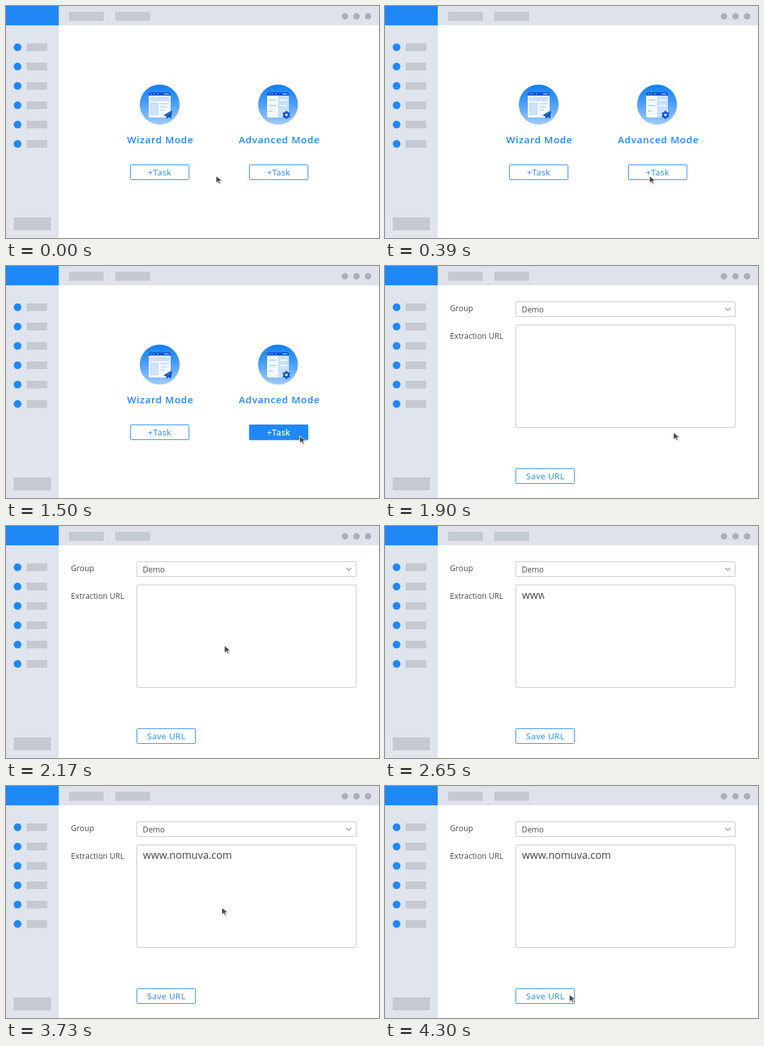
An HTML page for the animation above (4600 ms loop, 580 by 360 pixels).

```html
<!DOCTYPE html>
<html lang="en">
<head>
<meta charset="utf-8">
<title>Create a task</title>
<style>
  html, body { margin: 0; width: 100%; height: 100%; overflow: hidden; background: #fff; }
  svg { display: block; width: 580px; height: 360px; }
  text { font-family: "Open Sans", "Noto Sans", sans-serif; }
  .blue { fill: #2088f5; }
  .block { fill: #c5c9d2; }
  .title { font-size: 15px; font-weight: 600; letter-spacing: .8px; fill: #2088f5; text-anchor: middle; }
  .label { font-size: 12.2px; fill: #4a4a4a; }
  .field { fill: #fff; stroke: #c3c5cb; }
  .button rect { fill: #fff; stroke: #2088f5; }
  .button text { font-size: 13px; letter-spacing: .5px; fill: #2088f5; text-anchor: middle; }
  .button.on rect { fill: #2088f5; }
  .button.on text { fill: #fff; stroke: #fff; stroke-width: .3px; }
  .url { font-size: 16px; fill: #444; }
</style>
</head>
<body>
<svg viewBox="0 0 580 360">
  <defs>
    <linearGradient id="sky" x1="0" y1="0" x2="0" y2="1">
      <stop offset="0" stop-color="#147ff2"/>
      <stop offset=".4" stop-color="#3f98f6"/>
      <stop offset="1" stop-color="#a3cbfb"/>
    </linearGradient>
    <filter id="soft" x="-20%" y="-50%" width="140%" height="200%">
      <feGaussianBlur stdDeviation="1.6"/>
    </filter>
    <clipPath id="typed"><rect id="reveal" x="213" y="95" width="0" height="26"/></clipPath>
    <g id="window">
      <circle cx="31" cy="31" r="31" fill="url(#sky)"/>
      <rect x="14" y="12" width="34" height="39" rx="2" fill="#f4f9ff"/>
      <path d="M14 17V14a2 2 0 0 1 2-2H46a2 2 0 0 1 2 2V17Z" fill="#0b57c9"/>
      <path d="M17 14.5h1.5M21 14.5h1.5M27 14.5h1.5M38 14.5h7" stroke="#fff" stroke-width="1.2"/>
    </g>
  </defs>

  <rect width="580" height="360" fill="#fff"/>
  <rect width="82" height="360" fill="#dfe4ed"/>
  <rect x="82" width="498" height="30" fill="#dfe2ea"/>
  <rect class="blue" width="82" height="30"/>
  <g id="chrome">
    <rect class="block" x="98" y="9" width="54" height="14"/>
    <rect class="block" x="170" y="9" width="54" height="14"/>
    <rect class="block" x="12" y="328" width="58" height="20"/>
  </g>

  <g id="modes">
    <g transform="translate(208 122)">
      <use href="#window"/>
      <path d="M17 20h28v5H17ZM17 28.5h11.500v18H17Z" fill="#cde2fc" stroke="#a9cdfa" stroke-width=".7"/>
      <path d="M32 29.500h13M32 34.500h10M32 39.500h7" stroke="#b5d4fb" stroke-width="1.3"/>
      <path d="M50.500 39.500L37 47.500l4 1.800L42 53l2.600-2.400 4 1.900Z" fill="#0b57c9"/>
      <path d="M50 40L41.300 49.300" stroke="#8dbdf8" stroke-width=".6"/>
    </g>
    <g transform="translate(392 122)">
      <use href="#window"/>
      <path d="M31 17H48V51H31Z" fill="#c9e0fc"/>
      <path d="M17 24h11M17 32.500h11M17 41h6" stroke="#a3cafa" stroke-width="1.4"/>
      <path d="M34 24h11M34 32.500h11" stroke="#fff" stroke-width="1.4"/>
      <g id="gear" transform="translate(44 47)" class="gear" fill="#0b57c9">
        <circle r="4.800"/>
      </g>
    </g>
    <text class="title" x="240" y="213">Wizard Mode</text>
    <text class="title" x="425" y="213">Advanced Mode</text>
    <g class="button">
      <rect x="193.500" y="246.500" width="91" height="23" rx="1"/>
      <text x="239" y="263">+Task</text>
    </g>
    <rect id="glow" class="blue" x="378" y="247" width="92" height="24" filter="url(#soft)" opacity="0"/>
    <g class="button" id="task">
      <rect x="378.500" y="246.500" width="91" height="23" rx="1"/>
      <text x="424" y="263">+Task</text>
    </g>
  </g>

  <g id="form">
    <text class="label" x="101" y="70">Group</text>
    <text class="label" x="101" y="113">Extraction URL</text>
    <rect class="field" x="203.500" y="55.500" width="341" height="23" rx="1"/>
    <text class="label" x="212.500" y="72">Demo</text>
    <path d="M529 65l4 4 4-4" fill="none" stroke="#858b96" stroke-width="1.100"/>
    <rect class="field" x="203.500" y="91.500" width="341" height="159" rx="1"/>
    <text class="url" x="213" y="112.500" clip-path="url(#typed)">www.nomuva.com</text>
    <g class="button" id="save">
      <rect x="203.500" y="314.500" width="91" height="23" rx="1"/>
      <text x="249.500" y="331">Save URL</text>
    </g>
  </g>

  <g id="cursor">
    <path d="M1 1V12L3.700 9.700 5.600 13.500 7.700 12.500 6 8.900 10.300 8.500Z" fill="#888" opacity=".5" transform="translate(.7 .7)"/>
    <path d="M.7 .7V11.700L3.500 9.300 5.400 13 7.500 12 5.700 8.500 10 8.200Z" fill="#484848" stroke="#fff" stroke-width=".9"/>
  </g>
</svg>
<script>
  const LOOP = 4600, STEP = 30;
  const byId = id => document.getElementById(id);
  const [chrome, modes, form, glow, task, save, reveal, cursor, gear] =
    ["chrome", "modes", "form", "glow", "task", "save", "reveal", "cursor", "gear"].map(byId);

  function add(parent, tag, attrs) {
    const el = document.createElementNS("http://www.w3.org/2000/svg", tag);
    for (const key in attrs) el.setAttribute(key, attrs[key]);
    parent.append(el);
  }

  for (let i = 0; i < 6; i++) {
    const y = 64 + 30 * i;
    add(chrome, "circle", { class: "blue", cx: 18, cy: y, r: 6 });
    add(chrome, "rect", { class: "block", x: 32, y: y - 6, width: 32, height: 12 });
  }
  for (let i = 0; i < 3; i++) {
    add(chrome, "circle", { cx: 527 + 18 * i, cy: 16, r: 5, fill: "#abafba" });
  }
  for (let i = 0; i < 6; i++) {
    add(gear, "rect", { x: -1.4, y: -6.2, width: 2.8, height: 3, transform: `rotate(${60 * i})` });
  }
  add(gear, "circle", { r: 2.1, fill: "#d6e8fd" });

  // Cursor legs: start, end, from x, y, to x, y; it rests at the end until "hide".
  const legs = [
    { start: 0, end: 600, from: [326, 263], to: [456, 263], hide: 1870 },
    { start: 1870, end: 2470, from: [456, 263], to: [214, 101.5], hide: 2500 },
    { start: 3370, end: 4270, from: [366, 102], to: [286, 323], hide: LOOP }
  ];

  const progress = (t, start, end) => Math.min(1, Math.max(0, (t - start) / (end - start)));
  const show = (el, on) => el.setAttribute("visibility", on ? "visible" : "hidden");

  function draw(time) {
    const t = Math.floor((time % LOOP) / STEP + 1e-6) * STEP;
    const onForm = t >= 1530;
    show(modes, !onForm);
    show(form, onForm);
    task.classList.toggle("on", t >= 930);
    save.classList.toggle("on", t >= 4300);
    glow.setAttribute("opacity", 0.3 * progress(t, 930, 1500));
    reveal.setAttribute("width", 140 * progress(t, 2470, 3160));

    const leg = legs.find(l => t >= l.start && t < l.hide);
    show(cursor, leg);
    if (leg) {
      const p = progress(t, leg.start, leg.end);
      const [x, y] = leg.from.map((v, i) => v + (leg.to[i] - v) * p);
      cursor.setAttribute("transform", `translate(${x} ${y})`);
    }
  }

  const begin = performance.now();
  function tick() {
    draw(performance.now() - begin);
    requestAnimationFrame(tick);
  }
  tick();
</script>
</body>
</html>
```
